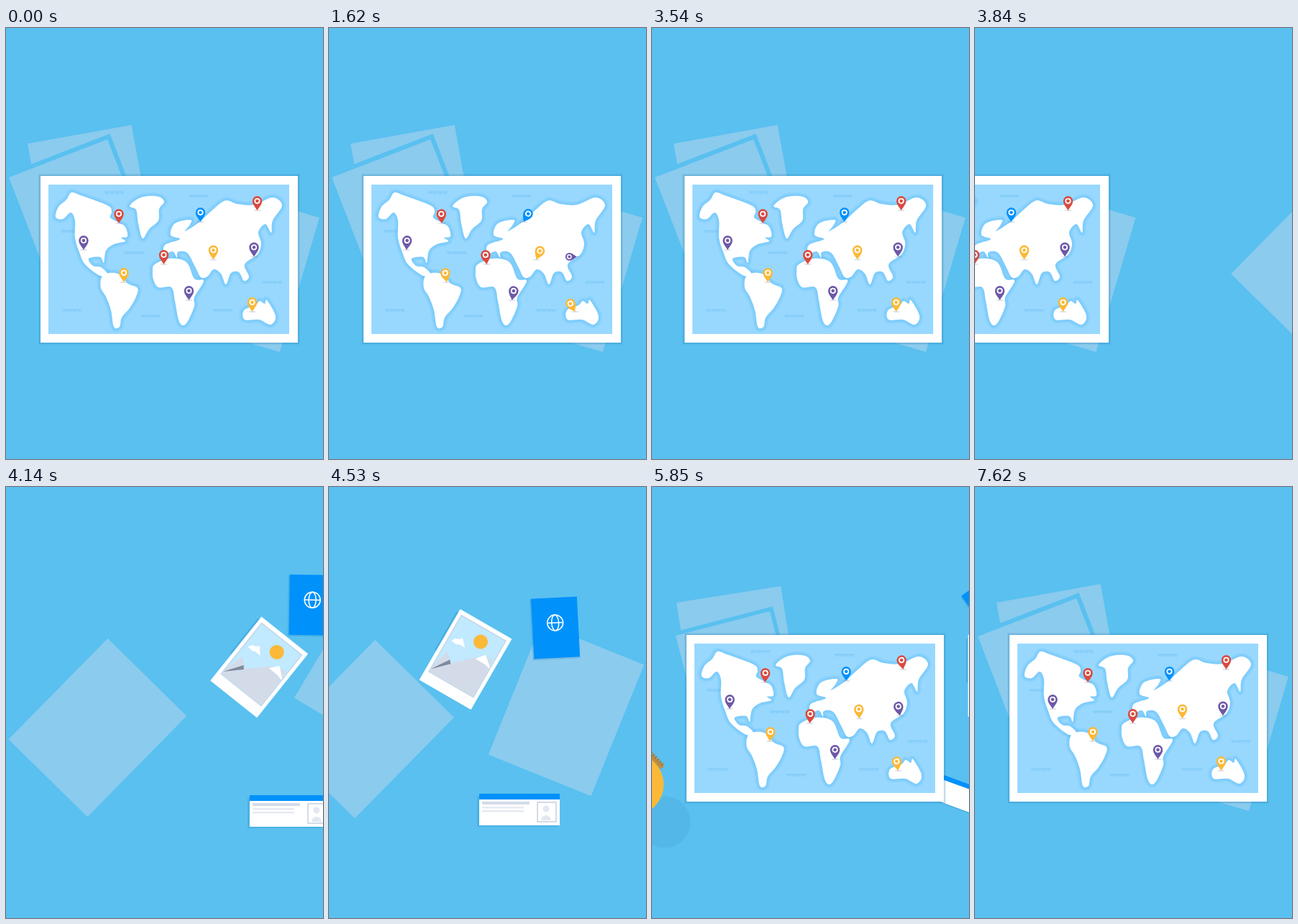
An HTML page with a canvas for the animation above (7.65 s loop, 441 by 600 pixels).

```html
<!DOCTYPE html>
<html lang="en">
<head>
<meta charset="utf-8">
<title>World map</title>
<style>
html, body { margin: 0; width: 100%; height: 100%; overflow: hidden; background: #59c0f0; }
canvas { display: block; width: 441px; height: 600px; }
</style>
</head>
<body>
<canvas id="stage"></canvas>
<script>
const LOOP = 7650, W = 441, H = 600;
const BG = '#59c0f0', GHOST = '#8acbee', BLUE = '#0091fb', LINE = '#d4dbe8';
const RED = '#da4a40', YELLOW = '#fbb937', PURPLE = '#6e58a8';
const canvas = document.getElementById('stage');
const c = canvas.getContext('2d');
const dpr = window.devicePixelRatio || 1;
canvas.width = W * dpr;
canvas.height = H * dpr;

const clamp = p => Math.max(0, Math.min(1, p));
const span = (t, from, to) => clamp((t - from) / (to - from));
const easeOut = p => 1 - (1 - p) ** 3;
const mix = (a, b, p) => a.map((v, i) => v + (b[i] - v) * p);

// A pose is [x, y, angle, scale].
function at([x, y, angle = 0, scale = 1], draw) {
  c.save();
  c.translate(x, y);
  c.rotate(angle * Math.PI / 180);
  c.scale(scale, scale);
  draw();
  c.restore();
}

function rect(color, x, y, w, h) {
  c.fillStyle = color;
  c.fillRect(x, y, w, h);
}

function disc(color, x, y, r) {
  c.fillStyle = color;
  c.beginPath();
  c.arc(x, y, r, 0, 7);
  c.fill();
}

function poly(color, ...p) {
  c.fillStyle = color;
  c.beginPath();
  for (let i = 0; i < p.length; i += 2) c.lineTo(p[i], p[i + 1]);
  c.fill();
}

// Smooth closed outline through a few points.
function blob(text) {
  const pts = text.split(' ').map(s => s.split(',').map(Number));
  const n = pts.length, get = i => pts[(i + n) % n], path = new Path2D();
  path.moveTo(...pts[0]);
  for (let i = 0; i < n; i++) {
    const [a, b, d, e] = [get(i - 1), get(i), get(i + 1), get(i + 2)];
    path.bezierCurveTo(b[0] + (d[0] - a[0]) / 6, b[1] + (d[1] - a[1]) / 6,
      d[0] - (e[0] - b[0]) / 6, d[1] - (e[1] - b[1]) / 6, d[0], d[1]);
  }
  path.closePath();
  return path;
}

const northAmerica = blob('69,263 73,249 84,239 91,229 104,233 121,239 143,248 147,256 145,264 157,271 166,277 169,290 160,292 166,297 150,301 139,310 136,327 131,319 115,321 121,331 132,333 141,342 131,345 110,329 102,312 96,292 96,268 90,257 79,266');
const southAmerica = blob('133,347 143,341 158,343 170,356 183,362 181,374 172,390 161,403 158,416 150,416 146,393 139,374 132,362');
const greenland = blob('172,248 183,238 197,234 213,235 220,242 213,252 212,268 199,280 190,293 184,272 181,253');
const africa = blob('204,338 207,329 228,321 251,326 262,349 275,352 262,375 262,387 253,408 246,414 240,406 235,380 230,361 212,361 205,350');
const eurasia = blob('221,314 221,302 242,294 229,288 235,272 257,267 255,275 249,283 268,271 291,250 306,240 322,245 345,246 371,236 384,247 371,268 369,285 361,273 351,284 355,300 350,315 332,329 338,346 331,352 324,340 313,341 306,357 299,342 289,336 280,346 271,347 263,332 252,313 239,312 238,320 232,311');
const australia = blob('331,393 347,386 353,380 360,384 363,379 375,401 368,413 352,406 332,406');
const land = [northAmerica, southAmerica, greenland, africa, eurasia, australia];

const waves = [[137, 227], [254, 232], [76, 281], [164, 311], [78, 391], [187, 399], [288, 391], [356, 352]];

// Tips and colours, from west to east.
const pins = [
  [108, 309, PURPLE], [157, 272, RED], [164, 354, YELLOW], [219.5, 329, RED],
  [254.5, 379, PURPLE], [270.5, 270, BLUE], [288.5, 322.5, YELLOW],
  [342.5, 395, YELLOW], [345, 318.5, PURPLE], [349.5, 254, RED]
];
const POP = 75;

function popStart(i, t) {
  if (t < 870) return -LOOP;
  return t < 4500 ? 945 + POP * i : 4890 + 1.25 * pins[i][0];
}

function drawPin([x, y, color], i, t) {
  const age = (t - popStart(i, t)) / POP;
  if (age <= 0) return;
  const scale = clamp(age / 1.25);
  const u = Math.max(0, age - 1);
  const angle = -90 * Math.exp(-.366 * u) * Math.cos(Math.PI * u / 3);
  c.fillStyle = 'rgba(70,90,130,.18)';
  c.beginPath();
  c.ellipse(x, y, 5 * scale, 1, 0, 0, 7);
  c.fill();
  at([x, y, angle, scale], () => {
    c.fillStyle = color;
    c.beginPath();
    c.moveTo(0, 0);
    c.bezierCurveTo(-2, -4, -6.7, -8, -6.7, -13.2);
    c.arc(0, -13.2, 6.7, Math.PI, 0);
    c.bezierCurveTo(6.7, -8, 2, -4, 0, 0);
    c.fill();
    c.strokeStyle = '#fff';
    c.lineWidth = 1.8;
    c.beginPath();
    c.arc(0, -13.2, 3.2, 0, 7);
    c.stroke();
  });
}

function drawWave([x, y]) {
  c.fillStyle = '#88cffa';
  c.beginPath();
  c.moveTo(x, y);
  c.lineTo(x + 28, y);
  for (let i = 4; i > 0; i--) {
    const r = x + i * 7;
    c.quadraticCurveTo(r - 1, y + 5, r - 2.5, y + 4);
    c.quadraticCurveTo(r - 5, y + 5, r - 7, y + 2);
  }
  c.fill();
}

function drawSheet(t) {
  rect('#fff', 48, 206, 358, 232);
  rect('#98d8ff', 59, 218, 335, 208);
  waves.forEach(drawWave);
  c.lineJoin = 'round';
  c.strokeStyle = 'rgba(95,190,245,.2)';
  for (const width of [10, 7, 4]) {
    c.lineWidth = width;
    land.forEach(p => c.stroke(p));
  }
  c.fillStyle = '#fff';
  land.forEach(p => c.fill(p));
  pins.forEach((p, i) => drawPin(p, i, t));
}

// Right edge of the sheet while it unrolls.
const sheetEdge = t => t < 4700 ? 406 : 75 + 331 * span(t, 4963, 5410);

function drawMap(t) {
  if (t > 3960 && t < 4730) return;
  const edge = sheetEdge(t);
  const flap = Math.min(27, (406 - edge) / 2);
  c.save();
  c.translate(t < 4700 ? -460 * span(t, 3450, 3950) ** 3 : 400 * (1 - easeOut(span(t, 4730, 4963))), 0);
  for (const m of [3, 2, 1]) rect('rgba(45,125,175,.12)', 48 - m, 206 - m, edge - 48 + 2 * m, 232 + 2 * m);
  c.save();
  c.beginPath();
  c.rect(48, 206, edge - flap - 48, 232);
  c.clip();
  drawSheet(t);
  c.restore();
  rect('#ebebeb', edge - flap, 206, flap, 232);
  c.restore();
}

function drawPolaroid() {
  rect('rgba(30,115,175,.25)', -44, -52, 60, 62);
  rect('#fff', -41.5, -57, 83, 114);
  rect('#c5d9e9', -36.5, -51, 73, 92);
  c.beginPath();
  c.rect(-35, -49.5, 70, 89);
  c.clip();
  rect('#c1e9ff', -35, -49.5, 70, 89);
  // The landscape leans against the card.
  c.rotate(-38.7 * Math.PI / 180);
  c.translate(-352.5, -251);
  poly(LINE, 290, 265, 330, 236, 331, 253, 368, 250, 390, 256, 355, 310);
  poly('#7e8aa0', 302, 257, 331, 248, 331, 254);
  poly('#fff', 366, 252, 381, 249, 385, 271, 378, 262);
  poly('#fff', 337, 222, 343, 220, 348, 222, 353, 221, 354, 235, 347, 229, 342, 228);
  disc(YELLOW, 377, 230, 10);
}

function drawPassport() {
  rect('rgba(30,115,175,.2)', -34, -41, 66, 85);
  rect(BLUE, -32, -42, 64, 84);
  c.strokeStyle = '#fff';
  c.lineWidth = 1.5;
  for (const rx of [11, 5]) {
    c.beginPath();
    c.ellipse(0, -7, rx, 11, 0, 0, 7);
    c.stroke();
  }
  rect('#fff', -11, -7.75, 22, 1.5);
}

function drawStub() {
  rect('rgba(30,115,175,.2)', -59, -19, 112, 43);
  rect('#fff', -56, -22, 112, 44);
  rect(BLUE, -56, -22, 112, 8);
}

function drawTicket() {
  drawStub();
  rect(LINE, -52, -11, 66, 4);
  rect('#e6eaf2', -52, -4, 58, 2.5);
  rect('#e6eaf2', -52, 1, 58, 2.5);
  c.strokeStyle = LINE;
  c.lineWidth = 2;
  c.strokeRect(25, -10, 26, 27);
  disc('#e3e8f0', 37, -1, 4.5);
  c.beginPath();
  c.arc(37, 15, 7, Math.PI, 0);
  c.fill();
}

function drawGlobe() {
  c.save();
  c.rotate(.82);
  rect('#c18d3a', -30, -49, 41, 6);
  for (let x = -29; x < 10; x += 4.4) rect('#a87a35', x, -51, 2.4, 4);
  c.restore();
  disc(YELLOW, 0, 0, 43);
}

const drawDot = () => disc('rgba(70,160,210,.28)', 0, 0, 36);
const drawGhost = () => rect(GHOST, -77, -98.5, 154, 197);
const drawPhoto = () => rect(GHOST, 0, 0, 147, 197);

function drawFrame(t) {
  drawGhost();
  c.globalAlpha = span(t, 4710, 5110);
  rect(BG, -67, -90, 128, 170);
}

function drawEdgedPhoto() {
  rect(BG, -6, -6, 159, 209);
  drawPhoto();
}

// Cards fly in from the right, rest, then leave on the left: [draw, passing, resting, leaving].
const cards = [
  [drawFrame, [128, 335, 44.5], [50, 337, 44.5], [-76, 440, 44.5]],
  [drawGhost, [519, 248, 31], [330, 310, 22], [-150, 330, 10]],
  [drawTicket, [396, 451, 0], [265, 449, 0], [-75, 445, 0]],
  [drawPassport, [427, 164, .8], [315, 196, -3], [-60, 210, -10]],
  [drawPolaroid, [353.5, 251, 38.7], [190, 240, 30], [-20, 219, 17]]
];

function drawCards(t) {
  if (t < 3700 || t > 5460) return;
  const ahead = Math.max(0, (4530 - t) / 390) ** 3;
  const past = Math.max(0, (t - 4710) / 480) ** 2;
  for (const [draw, passing, resting, leaving] of cards)
    at(mix(resting, t < 4600 ? passing : leaving, ahead + past), () => draw(t));
}

// Things thrown outwards from behind the middle of the sheet.
const thrown = [
  [drawDot, [18, 466]],
  [drawGlobe, [-26, 414, 0]],
  [drawPolaroid, [480.5, 263, 0]],
  [drawPassport, [480, 168, -35]],
  [drawStub, [430, 429, 20, .84]]
];

function drawThrown(t) {
  const p = (t - 5480) / 370;
  if (p < 0 || p > 1.8) return;
  for (const [draw, [x, y, angle, scale]] of thrown)
    at([...mix([227, 330], [x, y], p), angle, scale], draw);
}

// Pale pictures rise behind the sheet, then spread: [draw, near, far].
const backs = [
  [() => rect(GHOST, -154, 0, 154, 195), [400, 286, 15, .35], [436, 264, 16.4, 1]],
  [drawPhoto, [34, 161, -9, 1], [30, 161, -10.2, 1]],
  [drawEdgedPhoto, [33, 207, -14.5, .92], [4, 208, -21.1, 1]]
];

function drawBacks(t) {
  const leaving = t < 4200;
  if (!leaving && t < 5000) return;
  const spread = leaving ? 1 : easeOut(span(t, 5850, 6700));
  const hidden = leaving ? 0 : 1 - easeOut(span(t, 5430, 5850));
  backs.forEach(([draw, near, far], i) => {
    const pose = mix(near, far, spread);
    if (leaving) pose[0] -= 620 * Math.max(0, (t - 3560) / 480) ** 2;
    else if (i > 0) pose[0] += 60 * hidden, pose[1] += 90 * hidden;
    else if (t < 5850) pose[0] = Math.min(400, sheetEdge(t) + 32);
    if (i === 0 || leaving || t > 5430) at(pose, draw);
  });
}

function draw(t) {
  c.setTransform(dpr, 0, 0, dpr, 0, 0);
  rect(BG, 0, 0, W, H);
  drawBacks(t);
  drawCards(t);
  drawThrown(t);
  drawMap(t);
}

const begin = performance.now();
function tick() {
  draw((performance.now() - begin) % LOOP);
  requestAnimationFrame(tick);
}
tick();
</script>
</body>
</html>
```
